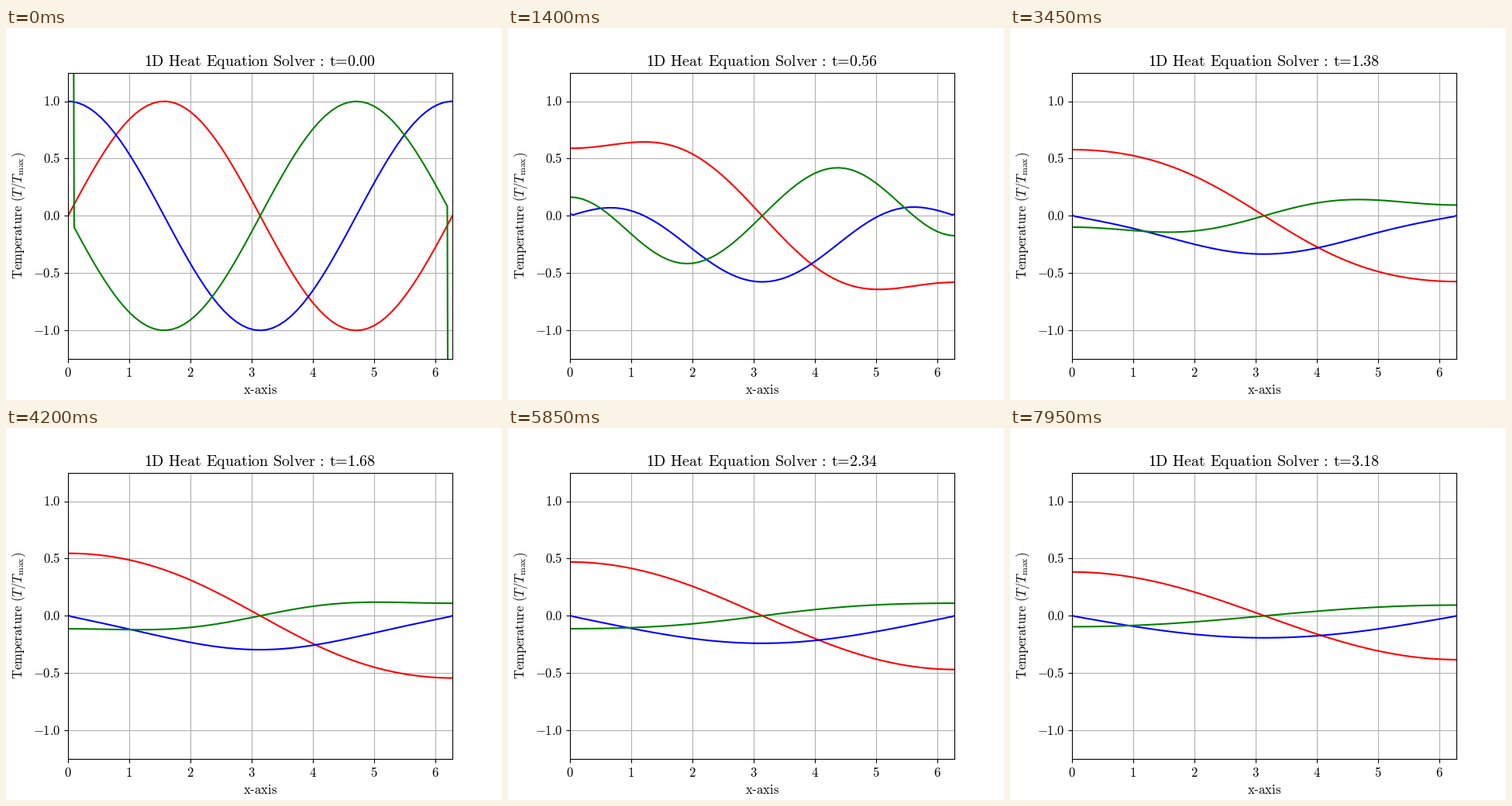
Animation, 640 px wide and 480 px high, one loop 8 s. Source, as a matplotlib script:

```python
import numpy as np
import matplotlib.pyplot as plt
from matplotlib.animation import FuncAnimation

W, H, DPI = 640, 480, 100
FRAMES, INTERVAL = 160, 50
FRAME_DT, SUBSTEPS = 0.02, 10
DX, NODES = 0.1, 64

plt.rcParams["mathtext.fontset"] = "cm"
SPACE = r"\hspace{0.38}"
TIGHT = r"\hspace{-0.2}"


def roman(words):
    """Upright math text with ordinary word spacing."""
    return SPACE.join(r"\mathrm{%s}" % w for w in words.split())


def title_text(t):
    head = roman("1D Heat Equation Solver")
    colon = SPACE + TIGHT + ":" + TIGHT + SPACE
    return rf"${head}{colon}\mathrm{{t}}{TIGHT}={TIGHT}{t:.2f}$"


def second_derivative(u):
    """Central differences with insulated (zero flux) ends."""
    out = np.empty_like(u)
    out[1:-1] = u[2:] - 2 * u[1:-1] + u[:-2]
    out[0] = 2 * (u[1] - u[0])
    out[-1] = 2 * (u[-2] - u[-1])
    return out / DX**2


def solve(x):
    u = np.sin(x)
    dt = FRAME_DT / SUBSTEPS
    states = [u]
    for _ in range(FRAMES - 1):
        for _ in range(SUBSTEPS):
            u = u + dt * second_derivative(u)
        states.append(u)
    return states


x = np.arange(NODES) * DX
x_flux = np.concatenate(([x[0]], (x[1:] + x[:-1]) / 2, [x[-1]]))
states = solve(x)

fig = plt.figure(figsize=(W / DPI, H / DPI), dpi=DPI, facecolor="white")
ax = fig.add_axes([0.125, 0.11, 0.775, 0.77])
ax.set_xlim(0, 2 * np.pi)
ax.set_ylim(-1.25, 1.25)
x_ticks = np.arange(7)
y_ticks = np.arange(-2, 3) / 2
ax.set_xticks(x_ticks, [""] * 7)
ax.set_yticks(y_ticks, [""] * 5)
ax.grid(True)


def label(px, py, text, size=12, ha="center", **kw):
    """Text with its baseline at a pixel position counted from the top left."""
    return fig.text(px / W, 1 - py / H, text, fontsize=size,
                    ha=ha, va="baseline", **kw)


for v in x_ticks:
    label(80 + 496 * v / (2 * np.pi), 450, f"${v}$")
for v in y_ticks:
    label(70.3, 242.4 - 147.84 * v + 5.5, f"${v:.1f}$", ha="right")
label(328, 472, "$\\mathrm{x\u2010axis}$")
label(21, 242, "$" + roman("Temperature") + SPACE + r"(T/T_{\mathrm{max}})$",
      rotation=90, rotation_mode="anchor")
title = label(328, 49, title_text(0), size=14.4)

temp, = ax.plot([], [], color="red", lw=1.5)
flux, = ax.plot([], [], color="blue", lw=1.5)
curv, = ax.plot([], [], color="green", lw=1.5)


def draw(i):
    u = states[i]
    edge = 1 / (1 + 2 * i)  # end slope fades towards zero
    temp.set_data(x, u)
    flux.set_data(x_flux, np.concatenate(([edge], np.diff(u) / DX, [edge])))
    curv.set_data(x, second_derivative(u))
    title.set_text(title_text(i * FRAME_DT))
    return temp, flux, curv, title


anim = FuncAnimation(fig, draw, frames=FRAMES, interval=INTERVAL,
                     repeat=True, repeat_delay=0, blit=False)
plt.show()
```
